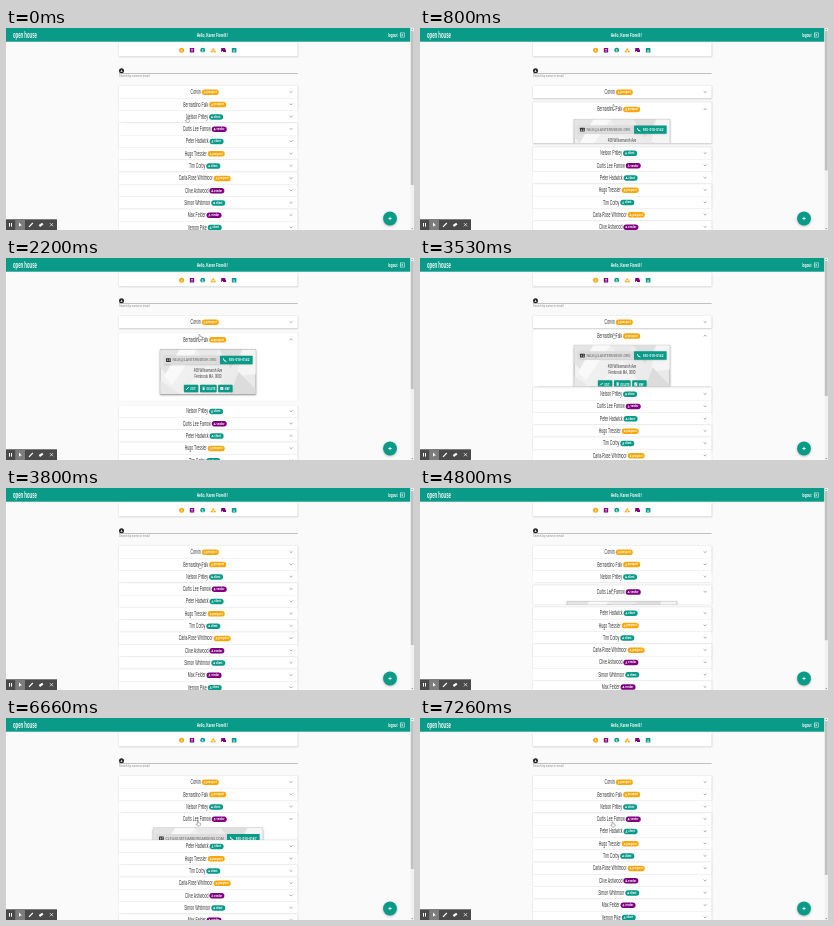
Animation of 408 by 202 pixels, one loop 7400 ms. Source, as an HTML page with a canvas:

```html
<!DOCTYPE html>
<html lang="en">
<head>
<meta charset="utf-8">
<title>open house</title>
<style>
  html, body { margin: 0; width: 100%; height: 100%; overflow: hidden; background: #fafafa; }
  canvas { display: block; width: 408px; height: 202px; }
</style>
</head>
<body>
<canvas id="stage" width="408" height="202"></canvas>
<script>
const ctx = document.getElementById('stage').getContext('2d');
const LOOP = 7400, STEP = 200 / 3;
const TEAL = '#0a9a88', ORANGE = '#fba60a', PURPLE = '#800080', INK = '#3a3a3a';
const LEFT = 113, RIGHT = 291.6, LIST_TOP = 57.8, ROW = 12.3;
const MARGIN = 4.1, GROW = 2.2, BODY = 54.2, NARROW = 0.52;

const KINDS = {
  prospect: { color: ORANGE, width: 17 },
  client: { color: TEAL, width: 14 },
  vendor: { color: PURPLE, width: 15 }
};
const CONTACTS = [
  ['Corvin', 'prospect'], ['Bernardino Falk', 'prospect'], ['Nelson Pritley', 'client'],
  ['Curtis Lee Farrow', 'vendor'], ['Peter Hadwick', 'client'], ['Hugo Tressler', 'prospect'],
  ['Tim Corby', 'client'], ['Carla-Rose Whitmoor', 'prospect'], ['Clive Ashwood', 'vendor'],
  ['Simon Whitmoor', 'client'], ['Max Felder', 'vendor'], ['Vernon Pike', 'client']
];
const CARDS = {
  1: { half: 48, email: 'FALK@LANTERNDESK.ORG', phone: '555-010-0142',
       lines: ['408 Willowmarsh Ave', 'Fernbrook MA, 0000'], open: 675, close: 3452 },
  3: { half: 55, email: 'CLF@QUIETHARBORGARDENS.COM', phone: '555-010-0187',
       lines: ['31200 Larch and Elm Rd', 'Oak Hollow TX 00000'], open: 4733, close: 6500 }
};
const POINTER = [
  [0, 180.5, 89.5], [460, 193, 76.5], [2200, 193, 76.5], [2260, 193, 75.5], [4200, 193, 75.5],
  [4660, 191.5, 101], [5200, 191.5, 101], [5260, 191.5, 103], [7200, 191.5, 103], [7260, 192, 104]
];

const clamp = v => Math.max(0, Math.min(1, v));

// cubic-bezier(.4, 0, .2, 1)
function ease(u) {
  u = clamp(u);
  let lo = 0, hi = 1;
  for (let i = 0; i < 20; i++) {
    const s = (lo + hi) / 2, r = 1 - s;
    if (1.2 * r * r * s + 0.6 * r * s * s + s ** 3 < u) lo = s; else hi = s;
  }
  return 3 * (1 - lo) * lo * lo + lo ** 3;
}

function openness(card, t, duration) {
  return ease((t - card.open) / duration) - ease((t - card.close) / duration);
}

function rect(x, y, w, h, color) {
  ctx.fillStyle = color;
  ctx.fillRect(x, y, w, h);
}

function pill(x, y, w, h, r, color) {
  ctx.fillStyle = color;
  ctx.beginPath();
  ctx.roundRect(x, y, w, h, r);
  ctx.fill();
}

function disc(x, y, r, color) {
  ctx.fillStyle = color;
  ctx.beginPath();
  ctx.arc(x, y, r, 0, Math.PI * 2);
  ctx.fill();
}

function poly(color, ...p) {
  ctx.fillStyle = color;
  ctx.beginPath();
  for (let i = 0; i < p.length; i += 2) ctx.lineTo(p[i], p[i + 1]);
  ctx.fill();
}

function line(color, width, ...p) {
  ctx.strokeStyle = color;
  ctx.lineWidth = width;
  ctx.beginPath();
  for (let i = 0; i < p.length; i += 2) ctx.lineTo(p[i], p[i + 1]);
  ctx.stroke();
}

function shadowed(draw, blur = 1.5, dy = 0.5, alpha = 0.2) {
  ctx.save();
  ctx.shadowColor = `rgba(0,0,0,${alpha})`;
  ctx.shadowBlur = blur;
  ctx.shadowOffsetY = dy;
  draw();
  ctx.restore();
}

function text(str, x, y, size, color, align = 'left', weight = 400) {
  ctx.font = `${weight} ${size}px Roboto, sans-serif`;
  ctx.textAlign = align;
  ctx.fillStyle = color;
  ctx.fillText(str, x, y);
}

const narrowFont = (size, weight) => `${weight} ${size}px "Liberation Sans", sans-serif`;

// Condensed display face
function narrow(str, x, y, size, color, align = 'left', weight = 400) {
  ctx.save();
  ctx.translate(x, y);
  ctx.scale(NARROW, 1);
  ctx.font = narrowFont(size, weight);
  ctx.textAlign = align;
  ctx.fillStyle = color;
  ctx.fillText(str, 0, 0);
  ctx.restore();
}

function person(x, y, s, color) {
  disc(x, y - s * 0.5, s * 0.5, color);
  pill(x - s, y + s * 0.2, s * 2, s * 0.7, s * 0.35, color);
}

function drawHeader() {
  rect(0, 0, 404.5, 13.7, TEAL);
  narrow('open house', 7, 9.7, 8.2, '#fff', 'left', 700);
  narrow('Hello, Karen Fiorelli !', 206.5, 9.2, 6.1, '#fff', 'center', 700);
  narrow('logout', 382, 9.2, 6, '#fff', 'left', 700);
  ctx.strokeStyle = '#d8f0ec';
  ctx.lineWidth = 0.6;
  ctx.strokeRect(394.6, 4.9, 3.8, 4.2);
  line('#d8f0ec', 0.6, 393.8, 7, 397, 7);
  line('#d8f0ec', 0.6, 395.8, 5.9, 397, 7, 395.8, 8.1);
}

function drawFilters() {
  shadowed(() => rect(LEFT, 14.5, RIGHT - LEFT, 13.8, '#fff'));
  const y = 22.2;
  disc(175.6, y, 2.5, ORANGE);
  person(175.6, y + 0.1, 1.1, '#fff');
  pill(183.8, y - 2.3, 4.4, 4.6, 0.5, PURPLE);
  line('#fff', 0.6, 184.9, y - 0.8, 187.1, y - 0.8);
  line('#fff', 0.6, 184.9, y + 0.8, 187.1, y + 0.8);
  disc(196.7, y, 2.4, TEAL);
  text('$', 196.7, y + 1.4, 3.8, '#fff', 'center', 700);
  poly(ORANGE, 207.2, y - 2.4, 208.6, y, 205.8, y);
  rect(204.8, y + 0.4, 2, 1.8, ORANGE);
  rect(207.6, y + 0.4, 2, 1.8, ORANGE);
  pill(215.2, y - 2.3, 4, 3.2, 0.4, PURPLE);
  poly(PURPLE, 215.2, y, 217, y, 215.2, y + 2);
  pill(217, y - 0.6, 3, 2.5, 0.4, PURPLE);
  pill(225.8, y - 2.3, 4.6, 4.6, 0.5, TEAL);
  person(228.1, y + 0.3, 1.1, '#fff');
}

function drawSearch() {
  disc(115.5, 42.7, 2.5, '#222');
  person(115.5, 42.8, 1.1, '#fff');
  rect(LEFT, 45.2, RIGHT - LEFT, 0.6, '#999');
  text('Search by name or email', LEFT, 49.3, 2.8, '#8c8c8c');
}

function drawChip(x, y, kind) {
  const { color, width } = KINDS[kind];
  pill(x, y - 2.7, width, 5.5, 2.7, color);
  person(x + 2.9, y, 1.1, '#fff');
  text(kind, x + 4.7, y + 0.9, 2.6, '#fff', 'left', 700);
}

function drawTitle([name, kind], y) {
  ctx.font = narrowFont(6.8, 400);
  const w = ctx.measureText(name).width * NARROW;
  const x = 198.7 - (w + 1 + KINDS[kind].width) / 2;
  narrow(name, x, y + 2.3, 6.8, INK);
  drawChip(x + w + 1, y + 0.3, kind);
}

function drawChevron(y, open) {
  const d = 0.7 * (1 - 2 * open);
  line('#888', 0.7, 283.6, y - d, 285.1, y + d, 286.6, y - d);
}

function drawButton(x, y, w, label, icon) {
  shadowed(() => pill(x, y, w, 7.4, 0.7, TEAL));
  const cx = x + 3.6, cy = y + 3.7;
  if (icon === 'pen') line('#fff', 1, cx - 1.2, cy + 1.2, cx + 1.2, cy - 1.2);
  else if (icon === 'bin') {
    rect(cx - 1, cy - 0.9, 2, 2.5, '#fff');
    rect(cx - 1.3, cy - 1.7, 2.6, 0.5, '#fff');
  } else {
    pill(cx - 1.5, cy - 1.6, 3, 3.2, 0.4, '#fff');
    line(TEAL, 0.5, cx - 0.8, cy + 0.8, cx + 0.8, cy - 0.8);
  }
  narrow(label, x + 6.6, y + 5.3, 4.4, '#fff', 'left', 700);
}

function drawFacets(x, y, w, h) {
  const bg = ctx.createLinearGradient(x, y, x + w, y + h);
  bg.addColorStop(0, '#f3f3f3');
  bg.addColorStop(1, '#e8e8e8');
  rect(x, y, w, h, bg);
  const facet = (color, ...p) => poly(color, ...p.map((v, i) => i % 2 ? y + v * h : x + v * w));
  facet('#e4e4e4', 0, 0, 0.2, 0, 0.06, 0.55, 0, 0.4);
  facet('#f9f9f9', 0.2, 0, 0.38, 0, 0.12, 0.8, 0.04, 0.6);
  facet('#e9e9e9', 0.38, 0, 0.62, 0, 0.5, 0.35);
  facet('#f4f4f4', 0.2, 1, 0.5, 0.35, 0.74, 1);
  facet('#dfdfdf', 0.62, 0, 0.86, 0, 0.74, 0.42);
  facet('#f5f5f5', 0.86, 0, 1, 0, 1, 0.55, 0.8, 0.6);
  facet('#dcdcdc', 0.74, 1, 0.82, 0.5, 1, 0.9, 1, 1);
  facet('#e8e8e8', 0, 0.7, 0.2, 1, 0, 1);
}

function drawCard(card, y) {
  const x = 202 - card.half, w = card.half * 2, phoneX = x + w - 36;
  shadowed(() => rect(x, y, w, 45, '#999'), 2, 0.8, 0.4);
  drawFacets(x + 0.4, y + 0.4, w - 0.8, 44);
  shadowed(() => rect(x + 3.6, y + 6.4, w - 40, 8.4, '#dcdcdc'));
  pill(x + 6, y + 8.8, 4.8, 3.8, 0.4, '#333');
  person(x + 7.6, y + 10.7, 0.8, '#fff');
  rect(x + 9, y + 9.8, 1.1, 0.5, '#fff');
  rect(x + 9, y + 11, 1.1, 0.5, '#fff');
  text(card.email, x + 12.4, y + 12, 3.6, '#666');
  shadowed(() => pill(phoneX, y + 6.4, 32.6, 8.4, 0.5, TEAL));
  ctx.strokeStyle = '#fff';
  ctx.lineWidth = 1;
  ctx.beginPath();
  ctx.arc(phoneX + 6.4, y + 9, 3, Math.PI * 0.5, Math.PI);
  ctx.stroke();
  text(card.phone, phoneX + 8.7, y + 11.8, 3.2, '#fff', 'left', 700);
  card.lines.forEach((s, i) => narrow(s, 202, y + 23 + i * 5.7, 5.7, INK, 'center'));
  drawButton(177.9, y + 35.4, 14.4, 'EDIT', 'pen');
  drawButton(194, y + 35.4, 16.6, 'DELETE', 'bin');
  drawButton(212.2, y + 35.4, 14.4, 'MAP', 'map');
}

function drawList(t) {
  let y = LIST_TOP;
  CONTACTS.forEach((contact, i) => {
    const card = CARDS[i];
    const spread = card ? openness(card, t, 180) : 0;
    const reveal = card ? openness(card, t, 360) : 0;
    const head = ROW + GROW * spread, body = BODY * reveal;
    y += MARGIN * spread;
    shadowed(() => rect(LEFT, y, RIGHT - LEFT, head + body, '#fff'));
    if (i) rect(LEFT, y, RIGHT - LEFT, 0.5, '#ececec');
    drawTitle(contact, y + head / 2);
    drawChevron(y + head / 2, reveal);
    if (body > 0.01) {
      ctx.save();
      ctx.beginPath();
      ctx.rect(LEFT, y + head, RIGHT - LEFT, body);
      ctx.clip();
      drawCard(card, y + head + 2.7);
      ctx.restore();
    }
    y += head + body + MARGIN * spread;
  });
  return y - LIST_TOP - ROW * CONTACTS.length;
}

function drawScrollbar(extra) {
  rect(404.5, 0, 3.5, 202, '#f1f1f1');
  rect(404.8, 3, 2.9, 154 - extra * 0.4, '#c1c1c1');
  poly('#888', 406.3, 0.8, 407.2, 2, 405.4, 2);
  poly('#888', 405.4, 200, 407.2, 200, 406.3, 201.2);
}

function drawFab() {
  shadowed(() => disc(384, 190.5, 6.9, TEAL), 2.5, 0.9, 0.3);
  line('#fff', 0.8, 382.3, 190.5, 385.7, 190.5);
  line('#fff', 0.8, 384, 188.8, 384, 192.2);
}

function drawToolbar() {
  rect(0, 191.3, 51, 10.7, '#4a4a4a');
  rect(9.2, 191.3, 9.8, 10.7, '#7c7c7c');
  rect(3, 195, 1, 3.6, '#fff');
  rect(5, 195, 1, 3.6, '#fff');
  poly('#fff', 13, 194.4, 16, 197.4, 14.5, 197.6, 13, 198.8);
  line('#fff', 1.2, 23, 198.8, 26.8, 195);
  line('#fff', 2.2, 33.4, 198, 36.8, 195.6);
  line('#fff', 0.7, 43.9, 195.1, 47.1, 198.3);
  line('#fff', 0.7, 47.1, 195.1, 43.9, 198.3);
}

function drawPointer(t) {
  let i = 0;
  while (i < POINTER.length - 2 && t >= POINTER[i + 1][0]) i++;
  const [t0, x0, y0] = POINTER[i], [t1, x1, y1] = POINTER[i + 1];
  const u = clamp((t - t0) / (t1 - t0)), k = u * u * (3 - 2 * u);
  ctx.save();
  ctx.translate(x0 + (x1 - x0) * k, y0 + (y1 - y0) * k);
  ctx.beginPath();
  for (const [x, y] of [[0, 0], [1, 0], [1, 1.8], [3.2, 2.2], [3, 4], [2.4, 5], [0.2, 5], [-1.3, 3], [0, 3.2]])
    ctx.lineTo(x, y);
  ctx.closePath();
  ctx.fillStyle = '#fff';
  ctx.strokeStyle = '#777';
  ctx.lineWidth = 0.5;
  ctx.fill();
  ctx.stroke();
  ctx.restore();
}

function render(now) {
  const t = Math.floor((now % LOOP + 7) / STEP) * STEP;
  rect(0, 0, 408, 202, '#fafafa');
  drawFilters();
  drawHeader();
  drawSearch();
  drawScrollbar(drawList(t));
  drawFab();
  drawToolbar();
  drawPointer(t);
}

const start = performance.now();
function tick() {
  render(performance.now() - start);
  requestAnimationFrame(tick);
}
tick();
</script>
</body>
</html>
```
